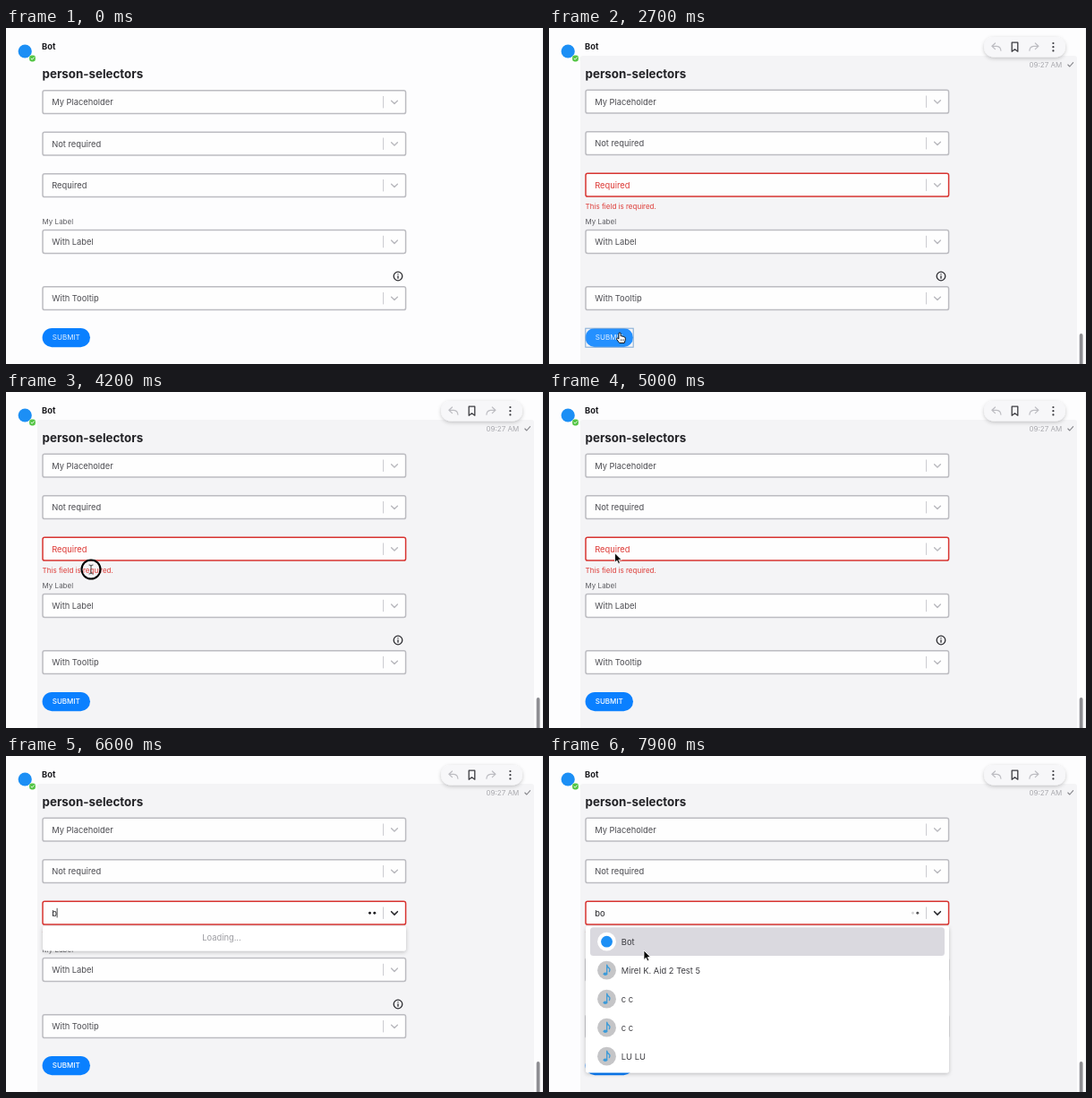
An HTML page that plays this animation: 600 px wide and 375 px high, repeating every 8 s.

```html
<!DOCTYPE html>
<html lang="en">
<head>
<meta charset="utf-8">
<title>Person selectors</title>
<style>
html, body { margin: 0; width: 100%; height: 100%; overflow: hidden; background: #fdfdfe; }
svg { display: block; width: 600px; height: 375px; }
text { font-family: Inter, sans-serif; font-size: 9.33px; fill: #4b4b50; }
.small { font-size: 8px; }
.line { fill: none; stroke-linecap: round; stroke-linejoin: round; }
</style>
</head>
<body>
<svg id="stage" viewBox="0 0 600 375" xmlns="http://www.w3.org/2000/svg">
  <defs>
    <filter id="soft" x="-20%" y="-40%" width="140%" height="200%">
      <feDropShadow dx="0" dy="1.5" stdDeviation="2" flood-color="#000" flood-opacity=".22"/>
    </filter>
  </defs>
  <rect width="600" height="375" fill="#fdfdfe"/>
  <path d="M599.5 0V375" stroke="#f1f1f4"/>

  <g id="hover">
    <path d="M35 375V34a3 3 0 0 1 3-3H587a3 3 0 0 1 3 3V375Z" fill="#f4f4f6"/>
    <rect x="592.7" y="341" width="3.8" height="40" rx="1.9" fill="#8d8d92"/>
    <rect x="486" y="10" width="91" height="22.5" rx="11.2" fill="#f7f7f9" filter="url(#soft)"/>
    <g class="line" stroke="#bdbdc2" stroke-width="1.2">
      <path d="M498.5 17l-3.6 3.3 3.6 3.3M495 20.3h5.5q4 .4 4.4 4.9"/>
      <path d="M543.3 17l3.6 3.3-3.6 3.3M546.8 20.3h-5.5q-4 .4-4.4 4.9"/>
    </g>
    <path class="line" d="M517.2 16.2h6.6v10l-3.3-2.4-3.3 2.4Z" stroke="#3c3c41" stroke-width="1.3"/>
    <g fill="#3c3c41"><circle cx="563.4" cy="17" r="1.1"/><circle cx="563.4" cy="21.2" r="1.1"/><circle cx="563.4" cy="25.4" r="1.1"/></g>
    <text class="small" x="536.5" y="43.6" style="fill:#a9a9ae">09:27 AM</text>
    <path class="line" d="M579.8 41l2 2 3.8-4.4" stroke="#85858a" stroke-width="1.1"/>
  </g>

  <circle cx="21.2" cy="26" r="7.6" fill="#1c8ff5"/>
  <circle cx="29.5" cy="34" r="4.3" fill="#fff"/>
  <rect x="26.1" y="30.6" width="6.8" height="6.8" rx="2.4" fill="#55c546"/>
  <path class="line" d="M28 34.1l1.2 1.1 2-2.3" stroke="#fff" stroke-width=".9"/>
  <text x="40" y="24" style="font-weight:700;fill:#1c1c20">Bot</text>
  <text x="40.6" y="56.3" style="font-size:13.33px;font-weight:700;fill:#222226">person-selectors</text>

  <g id="fields"></g>
  <text id="error" class="small" x="40.6" y="201.8" style="fill:#dd3a36">This field is required.</text>
  <text class="small" x="40.6" y="219.2" style="fill:#5c5c61">My Label</text>
  <g class="line" stroke="#2c2c30" stroke-width="1.3">
    <circle cx="438" cy="277" r="4.8"/><path d="M438 276.8v2.5M438 274.7v.1"/>
  </g>

  <rect id="button" x="40.6" y="335" width="53.4" height="21.2" rx="10.6"/>
  <text id="submit" class="small" x="67.3" y="348.4" text-anchor="middle">SUBMIT</text>
  <rect id="focus" x="40.8" y="335.2" width="53.4" height="21" fill="none" stroke="#7fa9d4" stroke-width="1"/>

  <g id="menu">
    <rect id="sheet" x="41" y="190" width="406" rx="2.7" fill="#fff" filter="url(#soft)"/>
    <text id="loading" x="241" y="206.2" text-anchor="middle" style="fill:#9b9ba0">Loading...</text>
    <g id="list"></g>
  </g>

  <g id="cursor">
    <g id="arrow">
      <path d="M0 0V10.4L2.4 8.2 4 11.8 5.8 11 4.2 7.5H7.5Z" fill="#000" stroke="#fff" stroke-width=".8"/>
    </g>
    <g id="hand">
      <path d="M-1.1 1Q-1 0 0 0 1 0 1.1 1V3.8Q2.4 3.2 2.9 4.3 4.2 3.7 4.7 4.9 6.3 4.6 6.3 6.2V8.2L5.2 11.5H-.3L-3.5 7.3Q-3.6 6-2.3 6.1L-1.1 7Z"
        fill="#fff" stroke="#000" stroke-width=".9" stroke-linejoin="round"/>
      <path d="M1 7.2V9.6M2.7 7.2V9.6M4.4 7.2V9.6" stroke="#000" stroke-width=".5"/>
    </g>
    <g id="beam" class="line">
      <path d="M-2-5Q0-5 0-3.8 0-5 2-5M0-3.8V3.8M-2 5Q0 5 0 3.8 0 5 2 5" stroke="#333" stroke-width=".9"/>
    </g>
  </g>
  <circle id="ring" fill="none" stroke="#000" stroke-width="2"/>
</svg>
<script>
const LOOP = 8000, STEP = 100;
const el = id => document.getElementById(id);
const show = (id, on) => el(id).style.display = on ? '' : 'none';
const set = (id, attrs) => { for (const k in attrs) el(id).setAttribute(k, attrs[k]); };
const clamp = v => Math.min(1, Math.max(0, v));
const ease = p => p * p * (3 - 2 * p);

const field = (label, y, i) => `<g id="field${i}">
  <rect id="box${i}" x="41" y="${y - 12.9}" width="405.6" height="25.8" rx="2.2" fill="#fefefe" stroke="#bcbcc1" stroke-width="1.5"/>
  <text id="value${i}" x="51.2" y="${y + 3.4}">${label}</text>
  <path d="M421.6 ${y - 6.7}v13.4" stroke="#c9c9ce" stroke-width="1"/>
  <path id="chevron${i}" class="line" d="M430.6 ${y - 1.5}l3.4 3.4 3.4-3.4" stroke="#b9b9be" stroke-width="1.4"/></g>`;

const extras = `<path id="caret" stroke="#222" stroke-width=".8"/>` +
  [401.2, 406.5, 411.8].map((x, i) => `<circle id="dot${i}" cx="${x}" cy="175.2" r="1.45" fill="#1c1c20"/>`).join('');

el('fields').innerHTML =
  [['My Placeholder', 82.7], ['Not required', 129.2], ['Required', 175.7], ['With Label', 238.5], ['With Tooltip', 301.7]]
    .map(([label, y], i) => field(label, y, i)).join('') + extras;

const note = y => `<circle cx="64.5" cy="${y}" r="10.4" fill="#c5c5c7"/>
  <ellipse cx="62.9" cy="${y + 4}" rx="2.3" ry="1.8" fill="#3d9bd8"/>
  <path class="line" d="M64.7 ${y + 4}V${y - 6}q.4 2.4 2.2 3.4 1.8 1.4.5 4" stroke="#3d9bd8" stroke-width="1.3"/>`;
const badge = y => `<circle cx="64.5" cy="${y}" r="10.4" fill="#fff"/><circle cx="64.5" cy="${y}" r="6.4" fill="#1c8ff5"/>`;

el('list').innerHTML = '<rect x="46" y="191.3" width="396" height="31.8" rx="3.5" fill="#dad9df"/>' +
  ['Bot', 'Mirel K. Aid 2 Test 5', 'c c', 'c c', 'LU LU'].map((name, i) => {
    const y = 207.2 + 32 * i;
    return (i ? note(y) : badge(y)) + `<text x="80.8" y="${y + 3.4}" style="fill:#3c3c41">${name}</text>`;
  }).join('');

// time, x, y
const path = [
  [700, 306, 388], [1000, 290, 366], [1100, 290, 366], [1600, 79, 345], [2200, 79, 345], [2400, 79, 340],
  [2700, 79, 340], [3400, 118, 246], [4100, 95, 198], [4200, 95, 198], [4300, 117, 199.5], [4400, 88, 199.5],
  [4500, 88, 199.5], [5200, 70, 175], [5700, 70, 175], [5900, 67, 172], [7250, 67, 172], [7900, 106, 217]
];
const clicks = [1750, 4100, 6390];

function place(t) {
  let i = path.findIndex(p => p[0] > t);
  if (i < 0) return path[path.length - 1].slice(1);
  if (i === 0) return path[0].slice(1);
  const a = path[i - 1], b = path[i], p = ease((t - a[0]) / (b[0] - a[0]));
  return [a[1] + (b[1] - a[1]) * p, a[2] + (b[2] - a[2]) * p];
}

// each dot waits at full strength, then pulses once a second
function pulse(age) {
  if (age < 0) return 1;
  const p = age % 1000 / 1000;
  return p > .8 ? 0 : ease(1 - Math.abs(p - .4) / .4);
}

function draw(t) {
  const [x, y] = place(t);
  const failed = t >= 2100, open = t >= 6500, typed = t >= 6570, listed = t >= 6900, second = t >= 7050;
  const overButton = x > 40 && x < 94 && y > 335 && y < 357;

  el('hover').style.opacity = ease(clamp((t - 1100) / 250));
  for (let i = 0; i < 3; i++) set('field' + i, { transform: `translate(0 ${failed ? -.5 : 0})` });
  show('error', failed);
  set('box2', { stroke: failed ? '#d83431' : '#bcbcc1' });
  set('chevron2', { stroke: open ? '#2a2a2e' : '#b9b9be', 'stroke-width': open ? 1.6 : 1.4 });

  const value = el('value2');
  value.textContent = second ? 'bo' : typed ? 'b' : 'Required';
  value.style.fill = typed ? '#222226' : failed ? '#dd3a36' : '';
  const since = t - (second ? 7050 : typed ? 6570 : 6500);
  const caretX = typed ? 51.4 + value.getComputedTextLength() : 51;
  set('caret', { d: `M${caretX} 169.8v10.6` });
  show('caret', open && since % 1000 < 500);

  const busy = typed && (!listed || second);
  for (let i = 0; i < 3; i++) el('dot' + i).style.opacity = busy ? pulse(since - 160 * i) : 0;

  show('menu', typed);
  show('loading', !listed);
  show('list', listed);
  set('sheet', { height: listed ? 163.5 : 27.5 });

  const blurred = t >= 4100;
  set('button', { fill: overButton ? '#2490ff' : '#0a80ff' });
  el('submit').style.fill = blurred ? '#fff' : '#e3f0ff';
  el('submit').style.fontWeight = blurred ? 500 : 400;
  show('focus', failed && !blurred);

  const overText = y > 193 && y < 206 && x < 121;
  set('cursor', { transform: `translate(${x} ${y})` });
  show('cursor', t >= 800 && (t < 6570 || t >= 7300));
  show('hand', overButton);
  show('beam', overText && !open);
  show('arrow', !overButton && (!overText || open));

  const hit = clicks.find(c => t >= c && t < c + 140);
  show('ring', hit !== undefined);
  if (hit !== undefined) set('ring', { cx: x, cy: y, r: 14 - (t - hit) * .035 });
}

const start = performance.now();
function tick() {
  const t = (performance.now() - start) % LOOP;
  draw(Math.floor(t / STEP) * STEP);
  requestAnimationFrame(tick);
}
tick();
</script>
</body>
</html>
```
